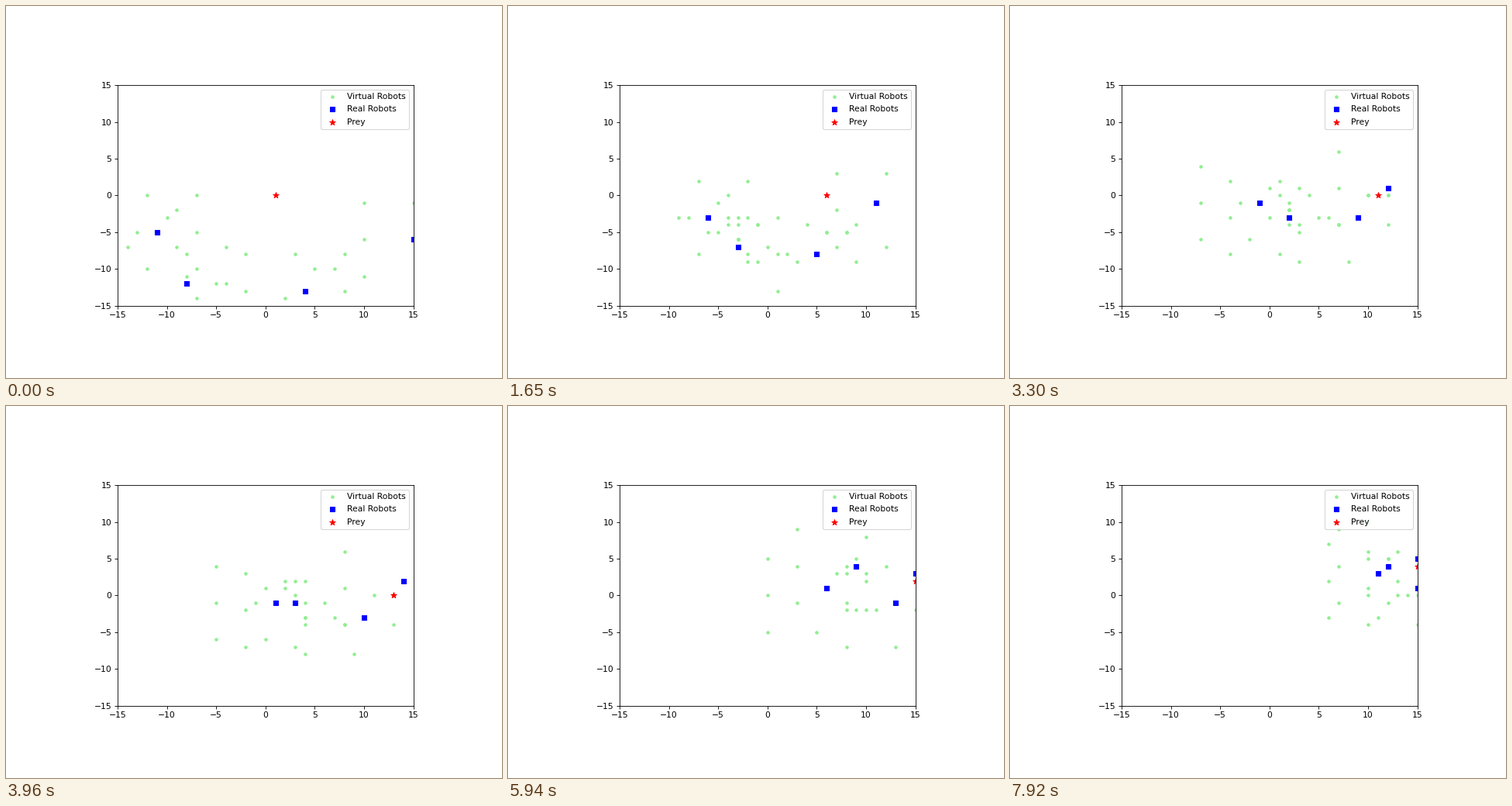
Animation of 640x480 px, one loop 8000 ms. Source, as a matplotlib script:

```python
import numpy as np
import matplotlib.pyplot as plt
from matplotlib.animation import FuncAnimation

DPI = 77
INTERVAL = 40      # ms per drawn frame
STEP_MS = 330      # ms per simulation step
LOOP_MS = 8000
WALL = 15
REACH = 5          # distance from a robot to its scouts
LAG = 0.6          # scouts follow where the robot was, in steps
CLOSE_IN = 8       # from this step on, scouts trail behind the robots

# Eight grid directions, counterclockwise from east.
turns = np.arange(8) * np.pi / 4
RING = np.column_stack([np.round(np.cos(turns)), np.round(np.sin(turns))])

# Waypoints of the four real robots.
TIMES = (-1, 5, 10, 18, 21, 24)
PATHS = (
    ((-12, -5.4), (-6, -3), (-1, -1), (6, 0.6), (9, 2), (11, 2.6)),
    ((-9, -12.5), (-3, -7), (1.6, -3), (8.6, 4.3), (10, 3), (12, 4)),
    ((3.3, -13.8), (4.6, -8), (8.6, -3), (13.4, -1.45), (14, 1), (15, 1)),
    ((16, -6.8), (11, -1), (12, 1), (18, 3), (18, 4), (18, 5)),
)

# Strays keep a fixed random offset from one of the first three robots.
rng = np.random.default_rng(4)
owners = np.arange(24) % 3
offsets = rng.integers(-3, 4, size=(24, 2))


def robots_at(t):
    """Grid cells of the real robots, stopped by the right wall."""
    cells = [[np.interp(t, TIMES, axis) for axis in zip(*path)] for path in PATHS]
    return np.minimum(np.round(cells), WALL)


def prey_at(step):
    """Runs right to the wall, then climbs one cell every three steps."""
    return min(WALL, 1 + step), max(0, (step - 12) // 3)


def fan(cell, step):
    """Scouts fan out toward the prey, later west and south of the robot."""
    if step < CLOSE_IN:
        dx, dy = prey_at(step) - cell
        heading = round(np.arctan2(dy, dx) / (np.pi / 4))
        dirs = np.arange(heading - 2, heading + 3) % 8
    else:
        dirs = np.arange(3, 7)
    return cell + REACH * RING[dirs]


def virtual_at(step):
    count = round(8 + 16 * np.exp(-((step - 7.5) / 5) ** 2))
    strays = robots_at(step)[owners[:count]] + offsets[:count]
    return np.vstack([strays] + [fan(c, step) for c in robots_at(step - LAG)])


fig = plt.figure(figsize=(8.3117, 6.2338), dpi=DPI, facecolor="white")
ax = fig.add_axes([0.2248, 0.1942, 0.59675, 0.5929])
ticks = range(-WALL, WALL + 1, 5)
ax.set(xlim=(-WALL, WALL), ylim=(-WALL, WALL), xticks=ticks, yticks=ticks)

virtual = ax.scatter([], [], s=10, c="lightgreen", marker="o", label="Virtual Robots")
robots = ax.scatter([], [], s=24, c="blue", marker="s", label="Real Robots")
prey = ax.scatter([], [], s=50, c="red", marker="*", label="Prey")
ax.legend(loc="upper right", labelspacing=0.6)


def draw(frame):
    step = ((frame + 1) * INTERVAL - 10) // STEP_MS
    virtual.set_offsets(virtual_at(step))
    robots.set_offsets(robots_at(step))
    prey.set_offsets([prey_at(step)])
    return virtual, robots, prey


anim = FuncAnimation(fig, draw, frames=LOOP_MS // INTERVAL, interval=INTERVAL,
                     repeat=True, repeat_delay=0)
plt.show()
```
